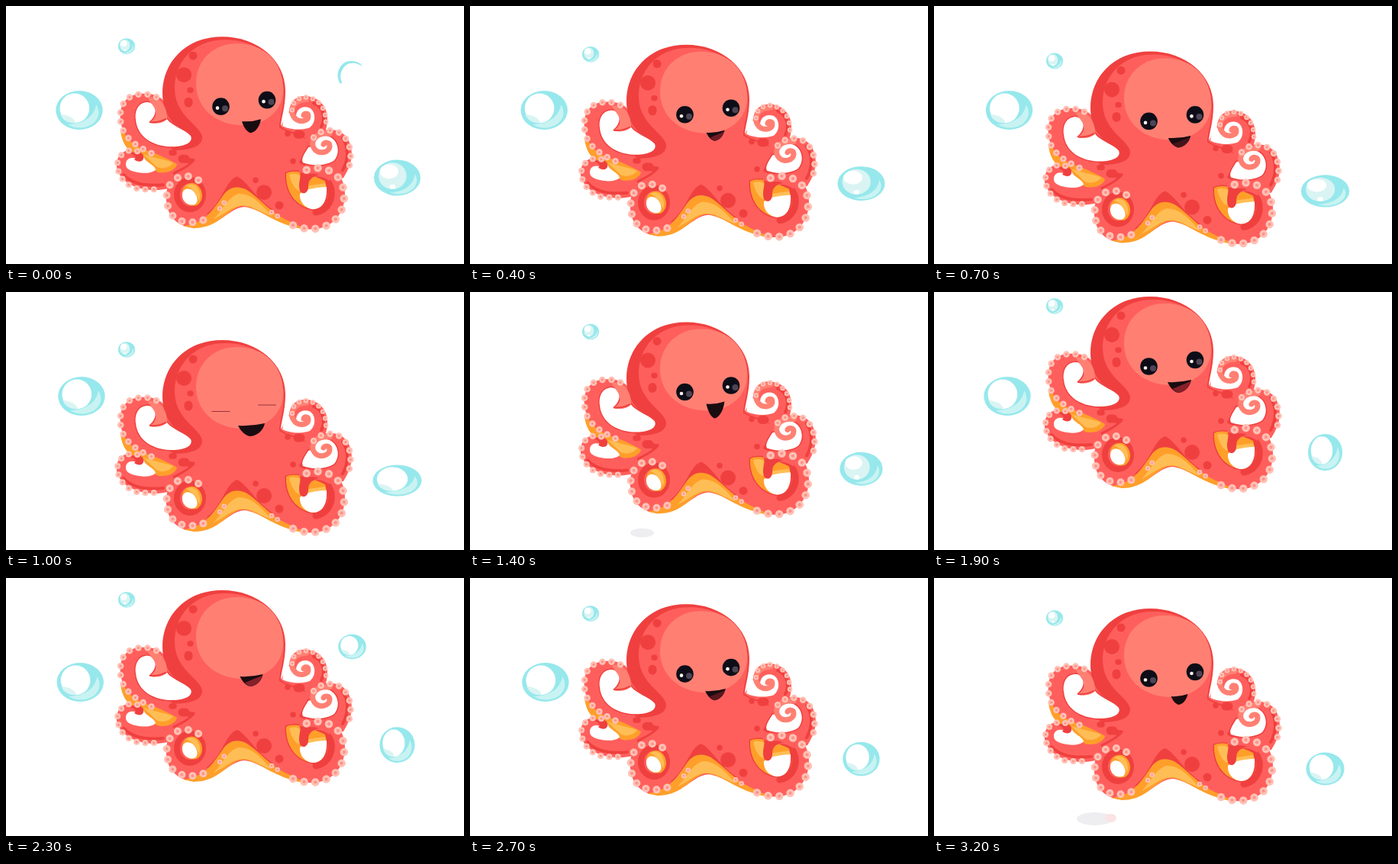
Animation of 600 by 338 pixels, one loop 3300 ms. Source, as an HTML page:

```html
<!DOCTYPE html>
<html lang="en">
<head>
<meta charset="utf-8">
<title>Octopus and bubbles</title>
<style>
html, body { margin: 0; width: 100%; height: 100%; overflow: hidden; background: #fff; }
svg { display: block; width: 600px; height: 338px; }
.main { fill: #ff5f5c; }
.dark { fill: #ef403f; }
.light { fill: #ff8073; }
.orange { fill: #ff9f2a; }
.amber { fill: #ffbe55; }
.white { fill: #fff; }
.rim { stroke: #ef403f; stroke-width: 3; paint-order: stroke; }
.shade, .curl, .cup, .pit { fill: none; stroke-linecap: round; }
.shade { stroke: #ef403f; }
.curl { stroke: #ff8073; stroke-width: 7; }
.cup { stroke: #ffc1b5; }
.pit { stroke: #ff9388; }
.ink { fill: #0d0d18; }
</style>
</head>
<body>
<svg viewBox="0 0 600 338">
<defs>
  <g id="bubble">
    <circle r="1" fill="#96e8ec"/>
    <path d="M-.5 .72C.1 .74 .62 .4 .72-.28C1 .25 .7 .84 .1 .9C-.15 .92-.35 .86-.5 .72Z" fill="#c8f3f2"/>
    <ellipse cx="-.2" cy="-.1" rx=".63" ry=".76" fill="#fff"/>
    <path d="M-.8 .2C-.5 .3-.3 .3-.16 .62C-.4 .75-.75 .5-.8 .2Z" fill="#d9f4f3"/>
  </g>
  <g id="paleBubble">
    <circle r="1" fill="#96e8ec"/>
    <path d="M-.3 .82C.25 .8 .7 .45 .76-.2C1 .25 .7 .84 .15 .9C0 .92-.15 .9-.3 .82Z" fill="#c8f3f2"/>
    <ellipse cx="-.2" cy="-.1" rx=".6" ry=".74" fill="#d9f4f3"/>
    <circle cx="-.35" cy="-.35" r=".4" fill="#fff"/>
    <circle cx="-.2" cy=".5" r=".13" fill="#fff"/>
  </g>
</defs>

<g id="shadow">
  <ellipse id="shadowBase" cy="315.500" fill="#eeeef0"/>
  <ellipse id="shadowTip" cx="231.500" cy="314.500" rx="7.500" ry="5.500" fill="#fbe3e3"/>
</g>

<g id="octopus">
  <!-- left arms -->
  <path class="main" d="M252 198L236 236L206 241C190 244 167 240 155 229C143 218 142 204 150 195C160 186 176 187 182 200L215 200Z"/>
  <path class="shade" stroke-width="4" d="M154 222C166 235 185 237 206 235"/>
  <path class="orange" d="M150 165L222 200C229 208 220 219 205 219C192 220 188 206 178 197C168 192 154 192 150 165Z"/>
  <path class="amber" d="M180 195C195 200 208 202 219 206C214 213 204 215 197 211Z"/>
  <path class="main" d="M207 126C200 116 185 115 173 116C154 119 148 135 150 150C152 170 165 184 187 191C205 197 215 203 224 208L262 200L262 170L216 146Z"/>
  <path class="white" d="M157 208C157 200 166 197 174 203C178 204 180 201 180 198C183 206 195 209 196 215C190 222 172 220 163 216C159 214 157 212 157 208Z"/>
  <path class="dark" d="M163 194C172 189 182 193 180 201C178 206 172 205 168 202C172 199 168 196 163 194Z"/>

  <!-- right arms -->
  <path class="main" d="M372 137C372 123 384 118 395 119C411 121 421 133 421 148C421 160 418 166 415 172L400 190L350 190L360 158Z"/>
  <path class="main" d="M390 190C398 169 412 162 428 163C446 165 453 180 453 196C452 208 448 216 442 226L415 230L370 215Z"/>
  <path class="shade" stroke-width="4" d="M403 128C418 134 418 150 413 159M441 174C450 186 448 204 441 216"/>

  <!-- head and body -->
  <path class="dark" d="M283 41C330 41 366 72 366 112C366 135 360 148 360 159C372 168 392 166 396 180L392 210L300 230L236 206L215 186C246 188 248 172 232 163C216 154 205 140 205 115C205 75 235 41 283 41Z"/>
  <path class="main" d="M287 45C332 45 364 75 364 112C364 135 358 148 358 160C372 169 388 170 398 178L384 206C390 212 400 208 410 210C430 211 444 224 444 247C444 275 424 296 395 293C355 289 335 266 312 264C290 266 280 291 245 291C224 290 211 275 210 255C209 240 214 226 228 221L248 201L212 196L216 190C240 190 258 186 257 172C254 156 221 145 221 108C221 75 245 45 287 45Z"/>
  <path class="light" d="M302 50C340 50 364 76 363 112C362 140 338 157 310 157C275 157 249 135 249 102C249 72 272 50 302 50Z"/>

  <!-- underside -->
  <path class="dark" d="M262 274C285 256 288 228 303 224C316 230 326 252 350 268L312 262Z"/>
  <path class="orange" d="M232 289C262 286 272 266 285 248C294 237 304 236 316 242C334 254 348 274 374 284C384 290 396 293 396 294C355 290 330 264 312 263C292 262 282 292 246 292Z"/>
  <path class="amber" d="M272 280C284 268 290 252 304 247C322 246 336 262 348 276C334 271 324 263 312 262C296 262 286 274 272 280Z"/>

  <!-- front left curl -->
  <ellipse class="shade" stroke-width="8" cx="241" cy="248" rx="17" ry="19"/>
  <path class="shade" stroke-width="3" d="M246 203C238 212 228 216 220 220"/>
  <path class="orange" d="M231 250C229 236 240 230 249 234C259 241 260 256 250 262C240 264 232 259 231 250Z"/>
  <path class="amber" d="M236 236C248 230 257 242 253 256C250 248 245 240 236 236Z"/>
  <path class="white" d="M231 250C230 240 239 238 245 243C251 249 253 258 247 261C239 263 232 258 231 250Z"/>

  <!-- front right curl -->
  <path class="shade" stroke-width="9" d="M412 226C432 230 432 266 406 271"/>
  <path class="orange rim" d="M367 220C378 214 396 220 418 230C423 250 418 266 402 267C380 264 366 245 367 220Z"/>
  <path class="amber" d="M371 222C378 219 384 221 388 225L389 243C381 246 374 234 371 222ZM397 236L418 233L420 239L394 242Z"/>
  <path class="white" d="M385 247C392 240 410 238 420 238C421 255 415 267 402 267C390 266 384 255 385 247Z"/>
  <path class="main" d="M383 218C390 211 410 209 424 216L424 230C412 222 402 222 397 230Z"/>
  <path class="dark" d="M385 219C392 221 404 219 410 222C400 224 396 229 396 237C396 246 389 249 385 243C382 232 387 226 385 219Z"/>

  <!-- openings and curled tips -->
  <path class="white rim" d="M170 150C168 135 176 126 187 127C197 129 198 140 192 148C189 152 187 152 188 153C195 156 206 153 211 149C217 158 236 163 242 171C246 180 232 186 214 185C192 184 172 172 170 150Z"/>
  <path class="light" d="M186 121C203 118 212 135 211 149C205 155 195 156 187 153C198 150 200 138 189 127Z"/>
  <path class="shade" stroke-width="2" d="M189 153Q200 154 209 149"/>
  <path class="white" d="M362 158C372 163 388 164 398 160C407 153 406 138 397 134C388 131 380 136 380 146L370 140L366 138Z"/>
  <path class="curl" d="M394 123C375 124 371 138 377 146C382 154 396 153 396 145C396 141 391 141 390 144"/>
  <path class="white rim" d="M396 186C392 193 386 200 389 206C402 211 420 210 430 203C438 194 436 178 424 172C412 168 404 174 402 184Z"/>
  <path class="curl" d="M424 168C404 166 398 180 404 188C410 196 424 193 424 184C424 179 417 179 416 182"/>

  <!-- spots, one path for each size -->
  <path class="shade" stroke-width="20" d="M233 91h.1M338 245h.1"/>
  <path class="shade" stroke-width="11" d="M245 66h.1M239 126v2M231 201h4M358 262h.1M382 169h4"/>
  <path class="shade" stroke-width="7.500" d="M241 111h1M217 193h3M327 229h.1M376 204h.1M369 168h.1"/>

  <g id="cups"></g>
  <g id="eyes"></g>
  <path id="mouth" fill="#190c10"/>
  <path id="tongue" fill="#86202a"/>
</g>

<use id="leftBubble" href="#bubble"/>
<use id="smallBubble" href="#paleBubble"/>
<use id="rightBubble"/>
<use id="topBubble" href="#bubble"/>
<path id="popArc" d="M467 79C462 71 447 69 440 77C433 85 433 94 438 102C441 101 440 99 439 97C437 89 440 82 446 77C453 73 460 75 467 79Z" fill="#96e8ec"/>
</svg>

<script>
const $ = id => document.getElementById(id);
const NS = "http://www.w3.org/2000/svg";
const LOOP = 3300, STEP = 100;

function add(parent, tag, attrs) {
  const el = document.createElementNS(NS, tag);
  for (const k in attrs) el.setAttribute(k, attrs[k]);
  parent.appendChild(el);
  return el;
}

// Suckers are round dashes along each arm
function suckers(d, size) {
  const ring = (name, width) => add($("cups"), "path",
    { d, class: name, "stroke-width": width, "stroke-dasharray": `0 ${size * 1.42}` });
  ring("cup", size);
  ring("pit", size * 0.4);
}
suckers("M197 120C182 113 164 116 156 125C148 136 148 152 154 165C162 180 178 188 196 196", 8.5);
suckers("M172 191C160 187 148 194 146 207C145 224 160 240 178 241L200 241", 8);
suckers("M252 229C240 221 224 222 216 233C208 245 209 262 217 274C230 290 258 285 270 275", 10);
suckers("M280 266L290 253M348 271L363 281", 6.5);
suckers("M376 288C390 293 400 294 408 292C432 288 444 270 443 246C441 226 428 214 408 213C400 213 393 215 388 219", 10.5);
suckers("M375 137C374 124 388 118 398 121C412 125 420 138 419 156", 6.5);
suckers("M403 173C412 162 430 161 440 169C452 180 455 200 447 218", 8.5);

const eyes = [[281.5, 132.5], [342, 124]].map(([x, y]) => {
  const g = add($("eyes"), "g", {});
  add(g, "circle", { r: 11.3, class: "ink" });
  add(g, "circle", { cx: 5.5, cy: 2.5, r: 4, fill: "#4d4556" });
  add(g, "circle", { cx: -4.5, cy: 2, r: 2.3, fill: "#fff1ec" });
  const lid = add($("eyes"), "path",
    { d: `M${x - 12} ${y + 2}h24`, stroke: "#7d2030", "stroke-width": .8 });
  return { g, lid, x, y };
});

// Cosine easing between key poses [step, ...values]
function pose(keys, n) {
  const i = Math.max(1, keys.findIndex(k => k[0] > n));
  const [from, to] = n >= keys.at(-1)[0] ? keys.slice(-2) : [keys[i - 1], keys[i]];
  const p = Math.min(1, (n - from[0]) / (to[0] - from[0]));
  const eased = (1 - Math.cos(Math.PI * p)) / 2;
  return from.slice(1).map((v, k) => v + (to[k + 1] - v) * eased);
}

// Sink, leap, settle
const bob = [[-2, -1.5], [10, 23], [19, -34], [30, 0]];
// y, rx, ry
const drift = [[0, 225, 30.5, 23.5], [10, 247, 32, 20.5], [19, 210, 22.5, 24], [32, 250, 25, 21.5]];
// width, height, tongue opacity
const smile = [[0, 25, 18, 0], [4, 24, 14, .8], [10, 35, 17, 0], [14, 24, 22, 0],
  [19, 31, 17, 1], [23, 30, 16, 1], [32, 22, 14, 0]];
const blinks = [10, 23];

const show = (el, on) => el.setAttribute("visibility", on ? "visible" : "hidden");
const place = (el, x, y, rx, ry) =>
  el.setAttribute("transform", `translate(${x} ${y}) scale(${rx} ${ry})`);
const within = (n, a, b) => n >= a && n <= b;

function drawMouth(n) {
  const [w, h, red] = pose(smile, n);
  const b = 167, t = b - h, l = 321.5 - w / 2, r = l + w;
  const chin = `${r - w * .35} ${b} ${l + w * .43} ${b}`;
  $("mouth").setAttribute("d", `M${l} ${t + 3}Q${l + w / 2} ${t + 4} ${r} ${t}` +
    `C${r - 2} ${t + h * .65} ${chin}` +
    `C${l + w * .2} ${b - h * .15} ${l + w * .08} ${t + h * .5} ${l} ${t + 3}Z`);
  $("tongue").setAttribute("d", `M${l + w * .2} ${t + h * .7}Q${l + w * .6} ${t + h * .4} ${r - 1} ${t + 2}` +
    `C${r - 3} ${t + h * .65} ${chin}Z`);
  $("tongue").setAttribute("opacity", red);
}

function drawEyes(n) {
  const open = Math.min(1, ...blinks.map(b => Math.abs(n - b) / 2));
  for (const { g, lid, x, y } of eyes) {
    show(g, open > 0);
    place(g, x, y, 1, open);
    show(lid, n === blinks[0]);
  }
}

function drawShadow(n, landed) {
  show($("shadowBase"), landed || within(n, 13, 15));
  show($("shadowTip"), landed);
  const [cx, rx, ry] = landed ? [211, 24, 8.5] : [225.5, 15.5, 6];
  for (const [k, v] of Object.entries({ cx, rx, ry })) $("shadowBase").setAttribute(k, v);
}

function render(n) {
  const [dy] = pose(bob, n);
  const landed = n >= 30;
  $("octopus").setAttribute("transform", `translate(0 ${dy - 1})`);
  drawMouth(n);
  drawEyes(n);
  drawShadow(n, landed);

  place($("leftBubble"), 97.5 - 1.5 * Math.cos(n / 3), 136.5, 30.7, 25.5);
  show($("leftBubble"), !landed && !within(n, 13, 15));
  place($("smallBubble"), 158, 52.5 + dy, 11, 10.3);
  place($("rightBubble"), 512.5, ...pose(drift, n));
  $("rightBubble").setAttribute("href", n < 8 || within(n, 12, 16) ? "#paleBubble" : "#bubble");
  place($("topBubble"), 453.5, 90, 18.3, 16.3);
  show($("topBubble"), within(n, 21, 26));
  show($("popArc"), n === 0);
}

let last = -1;
function tick() {
  const n = Math.floor(performance.now() % LOOP / STEP);
  if (n !== last) render(last = n);
  requestAnimationFrame(tick);
}
tick();
</script>
</body>
</html>
```
